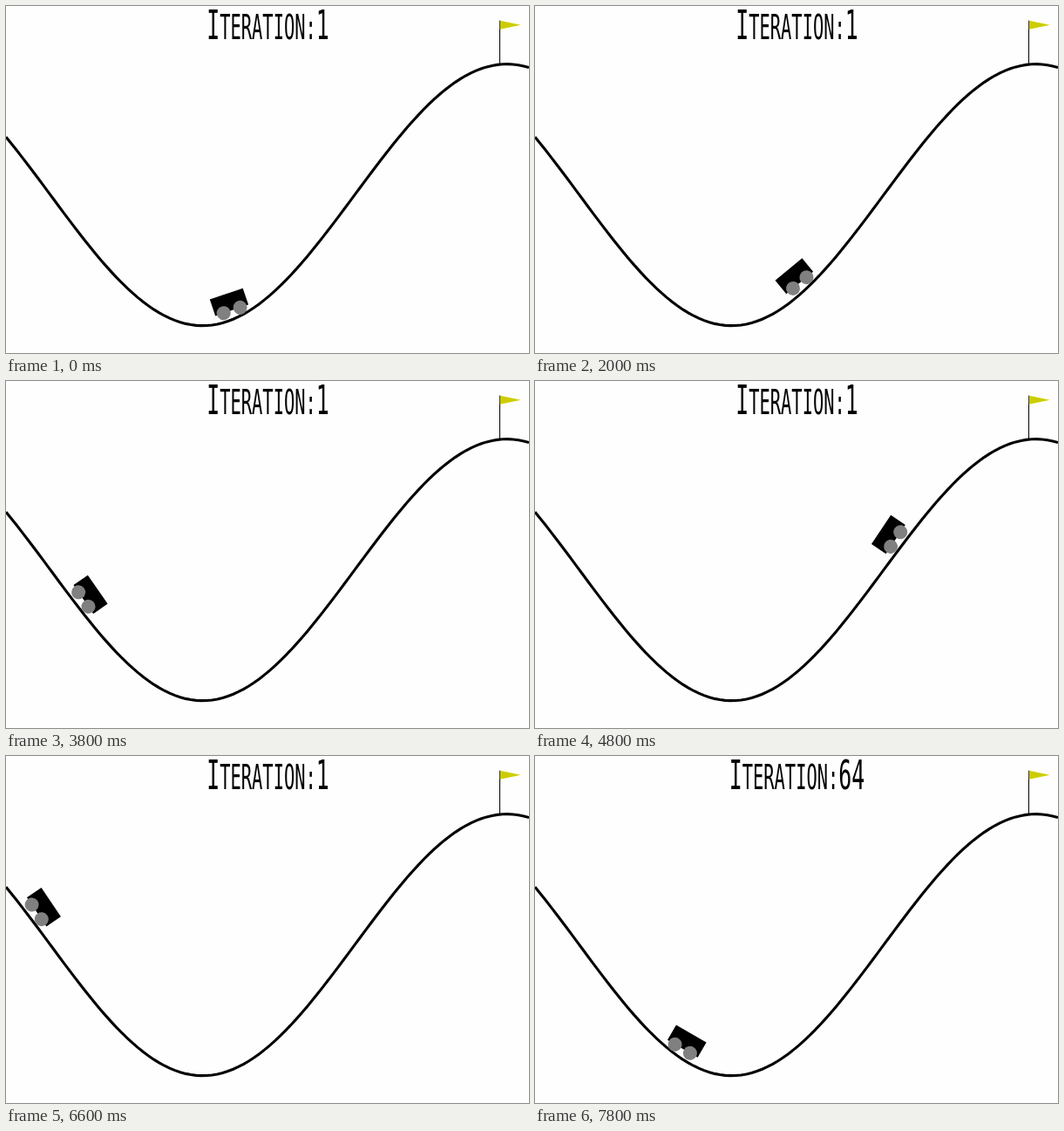
Animation, 600 px wide and 398 px high, one loop 8 s. Source, as an HTML page:

```html
<!DOCTYPE html>
<html lang="en">
<head>
<meta charset="utf-8">
<title>Mountain car</title>
<style>
  html, body { margin: 0; width: 100%; height: 100%; overflow: hidden; background: #fefefe; }
  svg { display: block; width: 100%; height: 100%; }
  text { font: 47px "DejaVu Sans Mono", monospace; text-anchor: middle; }
  .small { font-size: 38.5px; }
</style>
</head>
<body>
<svg viewBox="0 0 600 398">
  <text transform="translate(300.5 38) scale(.53 1)">I<tspan class="small">TERATION:</tspan><tspan id="count"></tspan></text>
  <path id="track" fill="none" stroke="#000" stroke-width="3.1"/>
  <g id="car">
    <rect x="-20" y="-30" width="40" height="20"/>
    <g fill="#808080">
      <circle cx="10" cy="-10" r="8"/>
      <circle cx="-10" cy="-10" r="8"/>
    </g>
  </g>
  <path d="M566.5 66.7V16.7" stroke="#000"/>
  <path d="M566.7 16.7V26.7L590.5 21.7Z" fill="#cccc00"/>
</svg>
<script>
const LOOP = 8000, TICK = 200;
const SCALE = 600 / 1.8, WALL = -1.2;

// Each run swings between turning points [tick, position] until its end tick.
const runs = [
  { end: 32, count: 1, turns: [[-.8, -.395], [4.8, -.758], [11.5, -.204], [17.85, -1.031], [24.94, .115], [33.5, -1.4]] },
  { end: 35, count: 1, turns: [[31.7, WALL], [41, .5]] },
  { end: 40, count: 64, turns: [[34.3, -.55], [41.5, -.765]] }
];

const $ = id => document.getElementById(id);
const screenX = x => (x - WALL) * SCALE;
const screenY = x => 400 - (.45 * Math.sin(3 * x) + .55) * SCALE;

// Half a cosine wave from one turning point to the next, stopped by the wall
function position(turns, tick) {
  const next = turns.findIndex(([t]) => t > tick);
  const [t0, x0] = turns[next - 1], [t1, x1] = turns[next];
  const eased = (1 - Math.cos(Math.PI * (tick - t0) / (t1 - t0))) / 2;
  return Math.max(WALL, x0 + (x1 - x0) * eased);
}

function draw(now) {
  const tick = Math.floor(now % LOOP / TICK);
  const { turns, count } = runs.find(run => tick < run.end);
  const x = position(turns, tick);
  const tilt = -Math.cos(3 * x) * 180 / Math.PI;
  $("car").setAttribute("transform", `translate(${screenX(x)} ${screenY(x)}) rotate(${tilt})`);
  $("count").textContent = count;
  requestAnimationFrame(draw);
}

const points = Array.from({ length: 100 }, (_, i) => WALL + 1.8 * i / 99);
$("track").setAttribute("d", "M" + points.map(x => `${screenX(x)} ${screenY(x)}`).join("L"));
draw(performance.now());
</script>
</body>
</html>
```
